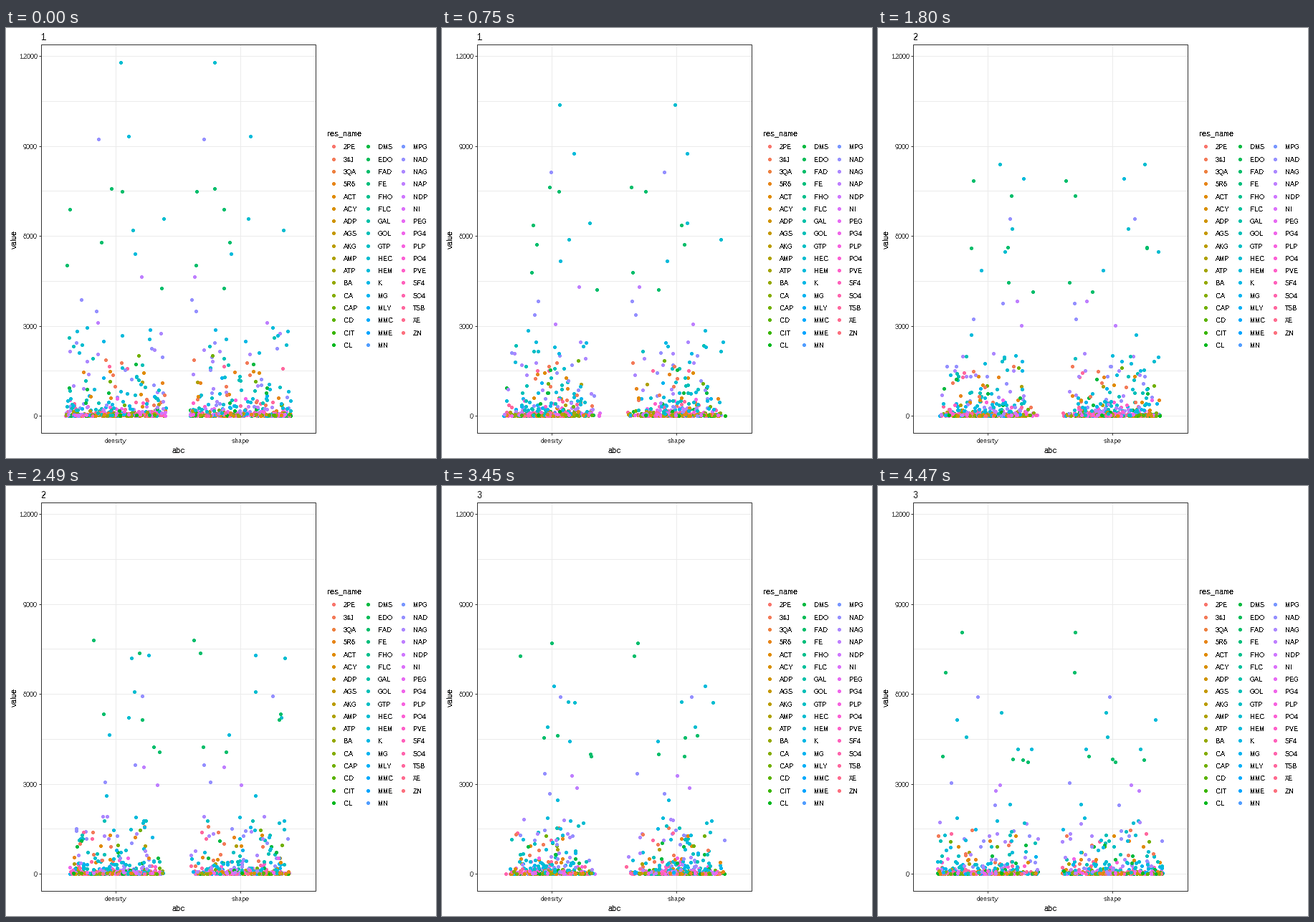
A matplotlib script for the animation above (4.5 s loop, 600x600 px).

```python
import numpy as np
import matplotlib
import matplotlib.pyplot as plt
from matplotlib.animation import FuncAnimation
from matplotlib.patches import Rectangle

FRAMES, INTERVAL = 150, 30
PT = 0.72  # points per pixel at 100 dpi
DOT = (4.35 * PT) ** 2
LEFT, RIGHT, TOP, BOTTOM = 49, 432, 23, 565
ZERO, SCALE = 540.9, 0.0418  # pixel row of value 0, pixels per unit
CENTERS = (153, 327)
JITTER = 70
GRID, DARK, TEXT = "#EBEBEB", "#333333", "#4D4D4D"

# Crisp, fully hinted lettering
matplotlib.rcParams.update({
    "font.family": "Liberation Sans",
    "text.hinting": "native",
    "text.hinting_factor": 1,
    "text.antialiased": False,
})

NAMES = ("2PE 34J 3QA 5R6 ACT ACY ADP AGS AKG AMP ATP BA CA CAP CD CIT CL "
         "DMS EDO FAD FE FHO FLC GAL GOL GTP HEC HEM K MG MLY MMC MME MN "
         "MPG NAD NAG NAP NDP NI PEG PG4 PLP PO4 PVE SF4 SO4 TSB XE ZN").split()


def hcl(hue, chroma=100, lum=65):
    """Polar CIE-LUV to sRGB, clipped to the gamut."""
    h = np.radians(hue)
    y = ((lum + 16) / 116) ** 3
    u = chroma * np.cos(h) / (13 * lum) + 0.1978398
    v = chroma * np.sin(h) / (13 * lum) + 0.4683363
    x = 9 * y * u / (4 * v)
    z = -x / 3 - 5 * y + 3 * y / v
    lin = np.array([3.240479 * x - 1.537150 * y - 0.498535 * z,
                    -0.969256 * x + 1.875992 * y + 0.041556 * z,
                    0.055648 * x - 0.204043 * y + 1.057311 * z])
    lin = np.clip(lin, 0, 1)
    return np.where(lin > 0.00304, 1.055 * lin ** (1 / 2.4) - 0.055, 12.92 * lin)


COLORS = {n: hcl(15 + 360 * i / len(NAMES)) for i, n in enumerate(NAMES)}

# The leading points: residue, then pixel rows, density columns and
# shape columns at the three time states.
LEADERS = [
    ("HEC", (48, 224, 367), (160, 172, 195), (291, 392, 366)),
    ("HEM", (151, 224, 326), (171, 211, 110), (341, 343, 387)),
    ("NAD", (155, 293, 294), (129, 197, 139), (276, 378, 323)),
    ("FAD", (224, 237, 204), (147, 195, 117), (291, 271, 275)),
    ("FAD", (228, 209, 260), (162, 126, 94), (266, 261, 274)),
    ("FAD", (253, 319, 377), (89, 203, 90), (304, 392, 294)),
]

UPPER = "HEC HEC FAD HEM FAD NAP FAD NAD NAD NAP".split()
COOL = "HEC HEM HEM HEC GTP GOL GOL K HEM MG NAD NAD NAG NAP NAD NAG".split()
MIXED = COOL + "5R6 34J 5R6 ACT AMP CAP TSB DMS".split()
LOW = ("ACT ACT ADP AKG AMP 5R6 5R6 34J BA CA CAP CD CIT CL CL EDO GOL GOL "
       "HEM MG MMC NAD NAG NDP PG4 PEG PO4 SO4 SO4 SO4 ZN TSB").split()
PINK = "NDP NI PEG PG4 PO4 PVE SO4 SO4 TSB NAP".split()


def build():
    """Rows, density and shape columns (state x point) and point colours."""
    rng = np.random.default_rng(12)
    upper = np.linspace(6570, 3100, len(UPPER))
    cool = 2950 * np.exp(-np.arange(16) / 41)
    mixed = 2000 * np.exp(-np.arange(110) / 41)
    groups = [(rng.exponential(30, 290), rng.choice(LOW, 290)),
              (rng.exponential(105, 70), rng.choice(PINK, 70)),
              (mixed, rng.choice(MIXED, len(mixed))),
              (cool, rng.choice(COOL, len(cool))),
              (upper, UPPER)]
    start = np.concatenate([g[0] for g in groups])
    kinds = np.concatenate([g[1] for g in groups])
    n = len(start)
    order = rng.permutation(n)
    start, kinds = start[order], kinds[order]

    tall = start > 3000
    second = start * rng.uniform(np.where(tall, 0.78, 0.5), 0.98, n)
    third = second * rng.uniform(0.68, 1.02, n)
    rows = ZERO - SCALE * np.array([start, second, third])
    cols = [c + rng.uniform(-JITTER, JITTER, (3, n)) for c in CENTERS]

    lead = [np.array([p[k] for p in LEADERS]).T for k in (1, 2, 3)]
    tracks = [np.hstack(pair) for pair in zip((rows, *cols), lead)]
    names = [*kinds, *(p[0] for p in LEADERS)]
    return tracks, [COLORS[k] for k in names]


TRACKS, DOT_COLORS = build()


def points(t):
    """Whole-pixel dot centres; t runs linearly through states 0, 1, 2."""
    k = min(int(t), 1)
    y, dens, shape = (s[k] + (s[k + 1] - s[k]) * (t - k) for s in TRACKS)
    xy = np.column_stack([np.hstack([dens, shape]), np.hstack([y, y])])
    return np.round(xy) + 0.5


fig = plt.figure(figsize=(6, 6), dpi=100, facecolor="white")
ax = fig.add_axes([0, 0, 1, 1])
ax.set_xlim(0, 600)
ax.set_ylim(600, 0)
ax.axis("off")


def line(x0, y0, x1, y1, color):
    ax.plot([x0 + 0.5, x1 + 0.5], [y0 + 0.5, y1 + 0.5], color=color, lw=PT,
            solid_capstyle="butt", snap=False, zorder=1)


def label(x, y, text, size, color="black", **kw):
    return ax.text(x, y, text, fontsize=size * PT, color=color,
                   va="baseline", **kw)


def scatter(xy, colors):
    return ax.scatter(*np.transpose(xy), s=DOT, c=colors, lw=0,
                      antialiased=False, zorder=3)


for value in range(0, 12001, 1500):
    y = round(ZERO - SCALE * value)
    line(LEFT, y, RIGHT, y, GRID)
    if value % 3000 == 0:
        line(LEFT - 3, y, LEFT, y, DARK)
        label(44, y + 4, str(value), 9, TEXT, ha="right")
for x, name in zip(CENTERS, ("density", "shape")):
    line(x, TOP, x, BOTTOM, GRID)
    line(x, BOTTOM, x, BOTTOM + 3, DARK)
    label(x, 579, name, 9, TEXT, ha="center")

ax.add_patch(Rectangle((LEFT + 0.5, TOP + 0.5), RIGHT - LEFT, BOTTOM - TOP,
                       fill=False, ec=DARK, lw=PT, snap=False, zorder=5))
label(240.5, 593, "abc", 11, ha="center")
label(15, 294.5, "value", 11, ha="center", rotation=90, rotation_mode="anchor")
title = label(49, 17, "1", 13)

label(448, 150, "res_name", 11)
keys = []
for i, name in enumerate(NAMES):
    col, row = divmod(i, 17)
    x, y = round(457 + 48.4 * col), round(165.4 + 17.28 * row)
    keys.append((x + 0.5, y + 0.5))
    label(x + 14, y + 4, name, 9)
scatter(keys, list(COLORS.values()))

dots = scatter(points(0), DOT_COLORS * 2)


def update(i):
    t = 2 * i / (FRAMES - 1)
    dots.set_offsets(points(t))
    title.set_text(str(round(1 + t)))
    return dots, title


anim = FuncAnimation(fig, update, frames=FRAMES, interval=INTERVAL,
                     repeat=True, repeat_delay=0)
plt.show()
```
